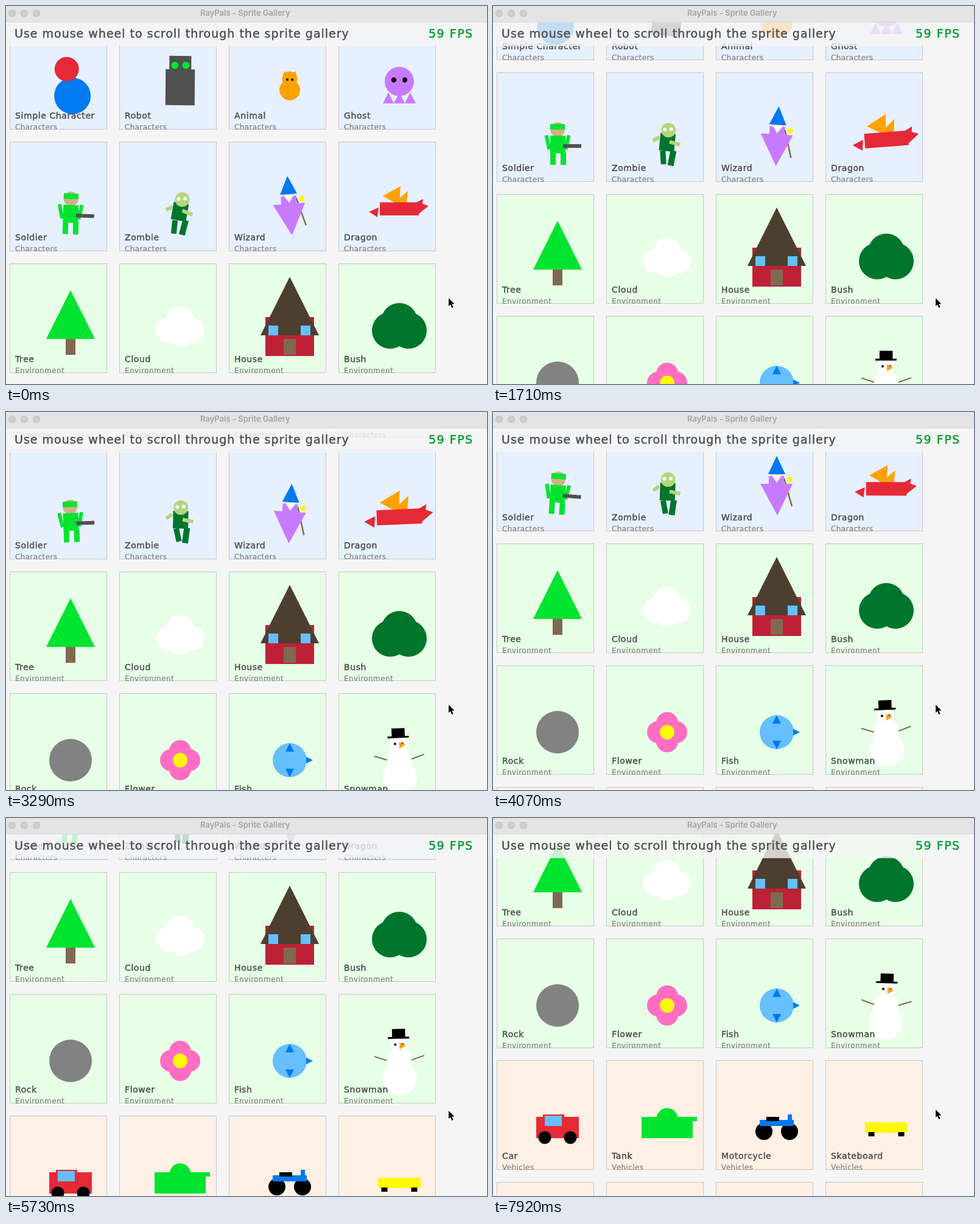
An HTML page with a canvas for the animation above (8000 ms loop, 790x621 px).

```html
<!DOCTYPE html>
<html lang="en">
<head>
<meta charset="utf-8">
<title>Sprite Gallery</title>
<style>
html, body { margin: 0; width: 100%; height: 100%; overflow: hidden; background: #f5f5f5; }
canvas { display: block; }
</style>
</head>
<body>
<canvas id="stage" width="790" height="621"></canvas>
<script>
const ctx = document.getElementById('stage').getContext('2d');
const LOOP = 8000, FIRST = 112, STEP = 87.64;

const RED = '#e62937', BLUE = '#0079f1', GREEN = '#00e430', DARK_GREEN = '#00752c',
  ORANGE = '#ffa100', PURPLE = '#c87aff', YELLOW = '#fdf900', PINK = '#ff6dc2',
  SKY = '#66bfff', BROWN = '#7f6a4f', DARK_BROWN = '#4c3f2f', MAROON = '#be2137',
  TAN = '#d3b083', DARK = '#505050', GRAY = '#828282', MOSS = '#b3d67e',
  BLACK = '#000', WHITE = '#fff';

// Drawing helpers
function rect(color, x, y, w, h) {
  ctx.fillStyle = color;
  ctx.fillRect(x, y, w, h);
}
function circle(color, x, y, r) {
  ctx.fillStyle = color;
  ctx.beginPath();
  ctx.arc(x, y, r, 0, 2 * Math.PI);
  ctx.fill();
}
function trace(pts) {
  ctx.beginPath();
  for (let i = 0; i < pts.length; i += 2) ctx.lineTo(pts[i], pts[i + 1]);
}
function poly(color, ...pts) {
  trace(pts);
  ctx.fillStyle = color;
  ctx.fill();
}
function line(color, width, ...pts) {
  trace(pts);
  ctx.strokeStyle = color;
  ctx.lineWidth = width;
  ctx.stroke();
}
function turned(deg, draw, x = 0, y = 0, scale = 1) {
  ctx.save();
  ctx.translate(x, y);
  ctx.rotate(deg * Math.PI / 180);
  ctx.scale(scale, scale);
  draw();
  ctx.restore();
}
function limb(color, x, y, w, h, deg) {
  turned(deg, () => rect(color, -w / 2, -h / 2, w, h), x, y);
}
function text(str, x, y, font, color, spacing, weight = 0) {
  ctx.font = font;
  ctx.fillStyle = ctx.strokeStyle = color;
  ctx.letterSpacing = spacing + 'px';
  ctx.fillText(str, x, y);
  if (weight) {
    ctx.lineWidth = weight;
    ctx.strokeText(str, x, y);
  }
}

// Interpolation through key times
function key(t, times, values, ease = p => p) {
  let i = 1;
  while (i < values.length - 1 && t > times[i]) i++;
  const p = Math.min(1, (t - times[i - 1]) / (times[i] - times[i - 1]));
  return values[i - 1] + (values[i] - values[i - 1]) * ease(p);
}
const smooth = p => p * p * (3 - 2 * p);
const POSE_TIMES = [0, 1705, 3282, 4066, 5730];
const pose = (t, ...values) => key(t, POSE_TIMES, values, smooth);
const SCROLL_TIMES = [0, 910, 1700, 3282, 3550, 4066, 4430, 5290, 5722, 6600, 7050, 7910];
const SCROLL = [1, 22, 115, 162, 180, 208, 219, 285, 334, 409, 409, 426];

// Sprites, drawn around their pivot
function simple(t) {
  turned(pose(t, -12, 12), () => {
    circle(BLUE, 0, 15, 30);
    circle(RED, 0, -30, 20);
  });
}
function robot(t) {
  turned(pose(t, .5, 5), () => {
    rect(DARK, -24, -29, 48, 59);
    rect(DARK, -18, -51, 36, 23);
    circle(GREEN, -9, -35.5, 6);
    circle(GREEN, 9, -35.5, 6);
  });
}
function animal(t) {
  turned(0, () => {
    circle(ORANGE, 0, 5, 17);
    circle(ORANGE, 0, -13, 12.5);
    poly(ORANGE, -12, -17, -9, -26, -3, -21);
    poly(ORANGE, 12, -17, 9, -26, 3, -21);
    circle(BLACK, -4, -12, 2);
    circle(BLACK, 4, -12, 2);
  }, 0, 0, pose(t, 1, 1.53));
}
function ghost() {
  circle(PURPLE, 0, -9, 24);
  for (const x of [-18, 0, 18]) poly(PURPLE, x - 9, 27, x, 9, x + 9, 27);
  circle(BLACK, -9, -11.5, 4.2);
  circle(BLACK, 9, -11.5, 4.2);
}
function soldier(t) {
  turned(pose(t, 2, 0, -2, 4, 5), () => {
    limb(GREEN, -16, 0, 6, 24, -12);
    limb(GREEN, 16, 0, 6, 24, 12);
    rect(GREEN, -12, 17, 9, 20);
    rect(GREEN, 5, 17, 9, 20);
    circle(TAN, 0, -21, 12);
    rect(GREEN, -12, -11, 25, 29);
    rect(GREEN, -12, -30, 24, 9);
    rect(DARK, 9, 3, 30, 6);
  }, 0, 5);
}
function zombie(t) {
  const lean = pose(t, 10, 5, 1, 2);
  limb(DARK_GREEN, -3.5 - .6 * lean, 30, 9, 22, -14 + 2 * lean);
  limb(DARK_GREEN, 10 - .4 * lean, 31, 10, 25, 7 + .8 * lean);
  limb(DARK_GREEN, 1 - .15 * lean, 5, 25, 29, lean);
  const head = 1 + .25 * lean;
  circle(MOSS, head, -15, 12);
  circle(WHITE, head - 6, -16, 3);
  circle(WHITE, head + 4.5, -16.5, 3);
  limb(MOSS, -18, -.5, 12, 6, -38 + 1.3 * lean);
  limb(MOSS, 13 - .1 * lean, 6.5, 18, 6, 10 + 1.2 * lean);
}
function wizard(t) {
  turned(pose(t, -4, 3.5, 3.5, 0, -2), () => {
    line(BROWN, 2.5, 12, -20, 25, 26);
    poly(PURPLE, -27, -11, 26, -11, 1, 41);
    rect(PURPLE, -13, -24, 25, 14);
    poly(TAN, -10, -27, 10, -27, 7, -22, -7, -22);
    poly(WHITE, -9, -26, 9, -26, 0, -13);
    poly(BLUE, 0, -57, -14, -27, 14, -27);
    circle(YELLOW, 21, -18, 4.7);
  }, 0, 3);
}
function dragon(t) {
  const scale = pose(t, 1, 1.12, 1.16, 1.04, 1);
  turned(-4.5 * Math.sin(Math.PI * t / 4000), () => {
    poly(ORANGE, -27, -21, 2, -37, 0, -9, -8, -10);
    poly(ORANGE, 14, -29, 12, -10, -8, -10);
    rect(RED, -32, -10.5, 64, 21.5);
    poly(RED, -50, 5, -34, -2, -36, 14);
    poly(RED, 22, -7, 39, -16, 36, 5);
    poly(RED, 30, -11, 48, -4.5, 31, 9);
  }, 0, 0, scale);
}
function tree() {
  poly(GREEN, 0, -66, -40, 14, 40, 14);
  rect(BROWN, -8, 14, 16, 26);
}
function cloud() {
  circle(WHITE, 0, -16, 23);
  circle(WHITE, -20, 0, 20);
  circle(WHITE, 20, 0, 20);
  circle(WHITE, 0, 5, 22);
}
function house() {
  rect(MAROON, -40, -22, 80, 64);
  poly(DARK_BROWN, 0, -88, -48, 8, 48, 8);
  rect(SKY, -35, -8, 16, 16);
  rect(SKY, 18, -8, 16, 16);
  rect(BROWN, -10, 14, 20, 26);
}
function bush() {
  circle(DARK_GREEN, 0, -15, 30);
  circle(DARK_GREEN, -15, 0, 30);
  circle(DARK_GREEN, 15, 0, 30);
}
function rock() {
  circle(GRAY, 0, 0, 35);
}
function flower() {
  for (const [x, y] of [[15, 0], [-15, 0], [0, 15], [0, -15]]) circle(PINK, x, y, 18);
  circle(YELLOW, 0, 0, 12);
}
function fish() {
  circle(SKY, 0, 0, 28);
  poly(BLUE, 27, -5.5, 38, 0, 27, 5.5);
  poly(BLUE, -7, -14, 0, -28, 7, -14);
  poly(BLUE, -7, 14, 0, 28, 7, 14);
}
function snowman(t) {
  turned(-2.5 * Math.sin(Math.PI * (t - 1600) / 4900), () => {
    circle(WHITE, 0, 28, 28);
    circle(WHITE, 0, 0, 21);
    circle(WHITE, 0, -27, 14);
    circle(BLACK, -6, -27, 2);
    circle(BLACK, 6, -27, 2);
    poly(ORANGE, 1, -30, 11, -25, 1, -19);
    rect(BLACK, -18, -39.5, 35, 3);
    rect(BLACK, -11, -52.5, 21.5, 14);
    line(BROWN, 2, -41, -8, -20, -1);
    line(BROWN, 2, 41, -8, 20, -1);
  });
}
function car() {
  rect(RED, -35, -17, 70, 35);
  rect(RED, -24, -21, 35, 5);
  rect(SKY, -21, -19, 28, 17);
  circle(BLACK, -21, 17, 10.5);
  circle(BLACK, 21, 17, 10.5);
}
function tank() {
  rect(GREEN, -42, -17, 84, 35);
  circle(GREEN, 0, -14, 17.5);
  rect(GREEN, 0, -17, 49, 7);
}
function motorcycle() {
  circle(BLACK, -21, 7, 14);
  circle(BLACK, 21, 7, 14);
  rect(BLUE, -28, -12, 56, 10);
  rect(BLUE, 18, -21, 7, 10);
  rect(BLACK, -17, -17, 21, 7);
}
function skateboard() {
  rect(YELLOW, -35, -8, 70, 17);
  rect(BLACK, -29.5, 8, 10, 7);
  rect(BLACK, 19.5, 8, 10, 7);
}

const CHARACTERS = ['Characters', '#e6f0ff'], ENVIRONMENT = ['Environment', '#e6ffe6'],
  VEHICLES = ['Vehicles', '#fff0e6'];
const ROWS = [
  [CHARACTERS, { 'Simple Character': simple, Robot: robot, Animal: animal, Ghost: ghost }],
  [CHARACTERS, { Soldier: soldier, Zombie: zombie, Wizard: wizard, Dragon: dragon }],
  [ENVIRONMENT, { Tree: tree, Cloud: cloud, House: house, Bush: bush }],
  [ENVIRONMENT, { Rock: rock, Flower: flower, Fish: fish, Snowman: snowman }],
  [VEHICLES, { Car: car, Tank: tank, Motorcycle: motorcycle, Skateboard: skateboard }]
];
const FACE = 'px "DejaVu Sans", sans-serif';

function card(x, y, color) {
  rect(color, x, y, 160, 180);
  ctx.strokeStyle = '#c8c8c8';
  ctx.lineWidth = 1;
  ctx.strokeRect(x + .5, y + .5, 159, 179);
}

function gallery(t) {
  const top = 24 - Math.round(key(t, SCROLL_TIMES, SCROLL));
  ROWS.forEach(([[category, color], sprites], row) => {
    const y = top + 200 * row;
    Object.entries(sprites).forEach(([name, draw], col) => {
      const x = 6 + 180 * col;
      card(x, y, color);
      turned(0, () => draw(t), x + 100, y + 110);
      text(name, x + 9, y + 162, 14 + FACE, DARK, .6, .5);
      text(category, x + 9, y + 180, 12 + FACE, GRAY, .4, .2);
    });
  });
  for (let col = 0; col < 4; col++) card(6 + 180 * col, top + 200 * ROWS.length, VEHICLES[1]);
}

function header() {
  rect('rgba(245,245,245,.8)', 0, 26, 790, 40);
  text('Use mouse wheel to scroll through the sprite gallery', 14, 52, 19 + FACE, DARK, 1, .5);
  text('59 FPS', 694, 52, 19 + FACE, '#009e2f', 1.5, .5);
  rect('#e4e4e4', 0, 0, 790, 26);
  rect('#d9d9d9', 0, 26, 790, 1);
  for (const x of [10, 30, 50]) {
    circle('#bcbcbc', x, 12, 6);
    circle('#cecece', x, 12, 5.2);
  }
  text('RayPals - Sprite Gallery', 319, 16, '600 13px Inter, sans-serif', '#a3a3a3', 0);
}

function cursor(t) {
  const y = t < 2200 ? 480 : t < 6850 ? 481 : 479;
  turned(0, () => {
    const arrow = [0, 0, 0, 13, 3, 10.5, 5.3, 16, 7.6, 15, 5.3, 9.7, 9.3, 9.3, 0, 0];
    ctx.lineJoin = 'round';
    line(WHITE, 2.4, ...arrow);
    poly(BLACK, ...arrow);
  }, 727, y);
}

function frame(now) {
  const n = Math.floor((now % LOOP - FIRST) / STEP);
  const t = n < 0 ? 0 : FIRST + 8 + n * STEP;
  rect('#f5f5f5', 0, 0, 790, 621);
  gallery(t);
  header();
  cursor(t);
  requestAnimationFrame(frame);
}
requestAnimationFrame(frame);
</script>
</body>
</html>
```
